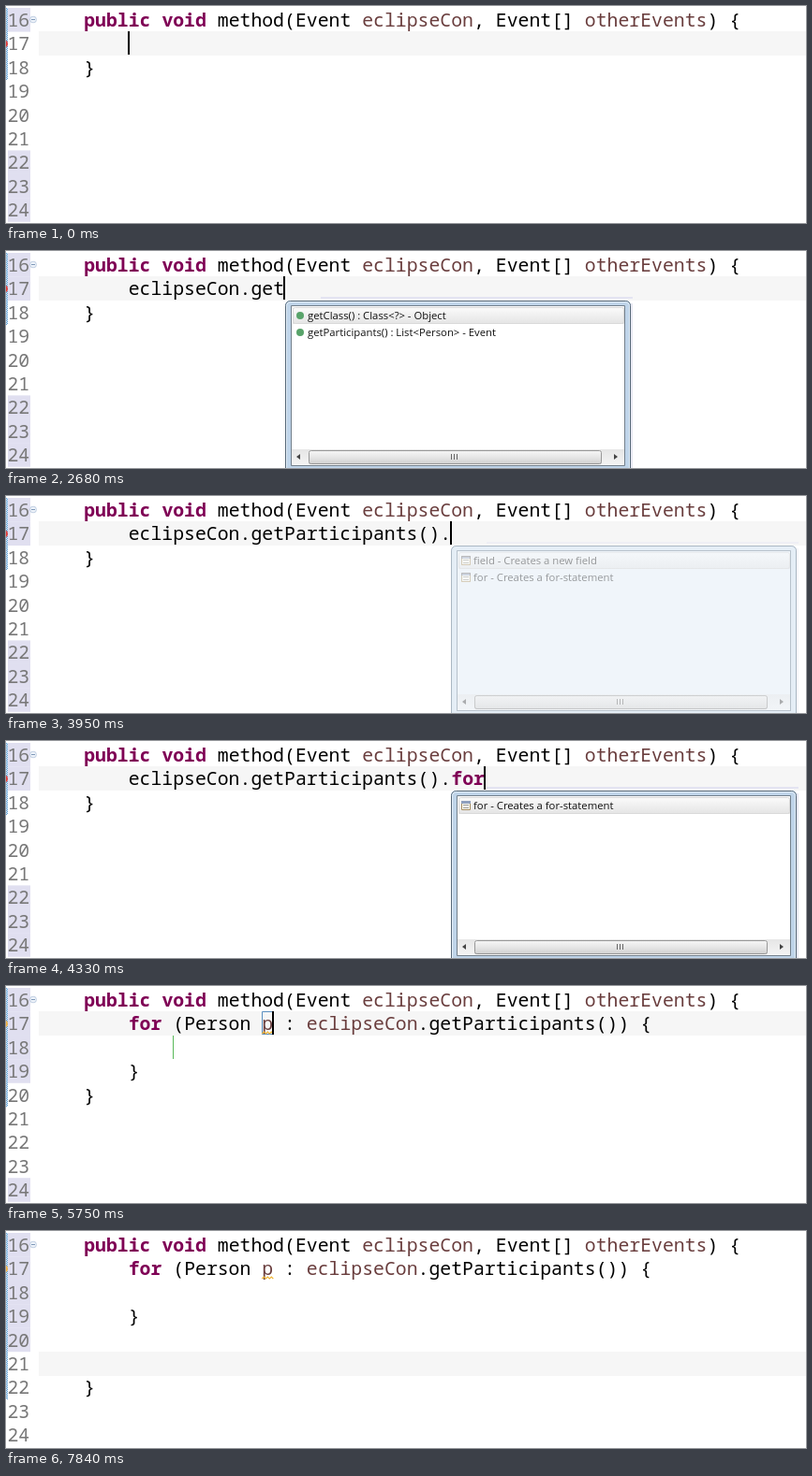
Animation of 854 by 232 pixels, one loop 8 s. Source, as an HTML page with a canvas:

```html
<!DOCTYPE html>
<html lang="en">
<head>
<meta charset="utf-8">
<title>Code completion</title>
<style>
  html, body { margin: 0; width: 100%; height: 100%; overflow: hidden; background: #fff; }
  canvas { display: block; }
</style>
</head>
<body>
<canvas id="stage" width="854" height="232"></canvas>
<script>
const ctx = document.getElementById('stage').getContext('2d');
const LOOP = 8000, COL = 11.88, ROW = 25.4, LEFT = 35.7, TOP = 2, FIRST = 16;
const CODE = '19.8px "Noto Sans Mono", monospace';
const UI = '11.3px "Open Sans", sans-serif';
const COLORS = { keyword: '#7f0055', param: '#6a3e3e', text: '#000', number: '#787878', changed: '#e0dff0' };
const KEYWORDS = new Set(['public', 'void', 'for']);
const PARAMS = new Set(['eclipseCon', 'otherEvents', 'p']);
const HEADER = 'public void method(Event eclipseCon, Event[] otherEvents) {';

const colX = col => LEFT + col * COL;
const rowY = line => TOP + (line - FIRST) * ROW;

// Typed text of line 17 and the time of each keystroke.
const TYPING = [
  [0, ''], [490, 'e'], [690, 'ecl'], [890, 'ecli'], [1090, 'eclipseCon'],
  [1720, 'eclipseCon.'], [2120, 'eclipseCon.g'], [2235, 'eclipseCon.ge'],
  [2350, 'eclipseCon.get'], [2810, 'eclipseCon.getP'], [3070, 'eclipseCon.getPa'],
  [3230, 'eclipseCon.getParticipants()'], [3560, 'eclipseCon.getParticipants().'],
  [4040, 'eclipseCon.getParticipants().f'], [4200, 'eclipseCon.getParticipants().fo'],
  [4330, 'eclipseCon.getParticipants().for']
];
// Caret moves after the template is inserted: time, line, column.
const MOVES = [[4590, 17, 26], [5520, 17, 21], [6050, 18, 12], [6810, 19, 9], [7110, 20, 8], [7310, 21, 8]];
const INSERTED = MOVES[0][0];

const latest = (list, t) => list.filter(item => item[0] <= t).pop();

function rect(x, y, w, h, color) {
  ctx.fillStyle = color;
  ctx.fillRect(x, y, w, h);
}

function frame(x, y, w, h, color, radius = 0) {
  ctx.strokeStyle = color;
  ctx.lineWidth = 1;
  ctx.beginPath();
  ctx.roundRect(x + .5, y + .5, w - 1, h - 1, radius);
  ctx.stroke();
}

function vertical(y, h, ...colors) {
  const gradient = ctx.createLinearGradient(0, y, 0, y + h);
  colors.forEach((c, i) => gradient.addColorStop(i / (colors.length - 1), c));
  return gradient;
}

function dot(x, y, r, color) {
  ctx.fillStyle = color;
  ctx.beginPath();
  ctx.arc(x, y, r, 0, 7);
  ctx.fill();
}

function codeLine(line, col, text, colored = true) {
  for (const [word] of text.matchAll(/\w+|\W+/g)) {
    const keyword = KEYWORDS.has(word);
    ctx.font = (keyword ? 'bold ' : '') + CODE;
    ctx.fillStyle = keyword ? COLORS.keyword
      : colored && PARAMS.has(word) ? COLORS.param : COLORS.text;
    ctx.fillText(word, colX(col), rowY(line) + 20);
    col += word.length;
  }
}

function gutter(t, lastLine) {
  const isChanged = n => {
    if (t < INSERTED) return n === 16 || n >= 22 || (n === 17 && t >= 430);
    if (t < 7110) return n <= 19 || n === 24;
    return n <= (t < 7310 ? 19 : 20);
  };
  ctx.font = CODE;
  for (let n = FIRST; n <= 24; n++) {
    if (isChanged(n)) rect(2, rowY(n), 24, ROW + .2, COLORS.changed);
    ctx.fillStyle = COLORS.number;
    ctx.fillText(n, 1.5, rowY(n) + 20);
  }
  // Checkered range marker along the method.
  const end = rowY(lastLine + 1);
  rect(0, TOP, 2, end - TOP, '#e4f0fa');
  for (let y = TOP; y < end; y++) rect(y % 2, y, 1, 1, '#5a9fd8');

  dot(29, 14.5, 3.8, '#c3d1e3');
  dot(29, 14.5, 2.8, '#eef3fa');
  rect(27, 14, 4, 1, '#7f98b8');

  const warning = t >= 5750;
  const markerLine = t >= INSERTED && !warning ? 19 : 17;
  dot(-2, rowY(markerLine) + 13, 4, warning ? '#f3b54a' : '#e5403c');
}

function arrow(x, y, dir) {
  ctx.fillStyle = '#444';
  ctx.beginPath();
  ctx.moveTo(x - dir * 2, y - 3);
  ctx.lineTo(x + dir * 2, y);
  ctx.lineTo(x - dir * 2, y + 3);
  ctx.fill();
}

function popup(x, items, alpha, isMethod) {
  ctx.save();
  ctx.globalAlpha = alpha;
  ctx.translate(x, 0);
  rect(38, 49, 333, 2, '#e4e4f2');
  rect(369, 56, 2, 176, '#e8e8f2');
  ctx.fillStyle = '#bfd4e9';
  ctx.beginPath();
  ctx.roundRect(0, 53, 369, 190, 5);
  ctx.fill();
  frame(0, 53, 369, 190, '#566878', 5);
  frame(1, 54, 367, 190, '#e3eef8', 4);
  frame(6, 58, 357, 172, '#73808c');
  rect(7, 59, 355, 170, '#fff');

  rect(8, 61, 354, 17, vertical(61, 17, '#fafafa', '#e4e4e4'));
  frame(8, 60, 354, 18, '#d9d9d9', 2);
  items.forEach((item, i) => {
    const y = 60 + i * 18;
    if (isMethod) dot(16, y + 9, 4, '#58a36a');
    else {
      rect(11, y + 4, 10, 10, '#fffdf0');
      frame(11, y + 4, 10, 10, '#a58d63');
      rect(11, y + 4, 10, 3, '#8e9fbe');
      for (let k = 0; k < 2; k++) rect(13, y + 8 + k * 3, 6, 1, '#9a9a9a');
    }
    ctx.font = UI;
    ctx.fillStyle = '#111';
    ctx.fillText(item, 24, y + 13);
  });

  rect(7, 212, 355, 17, vertical(212, 17, '#e6e6e6', '#f4f4f4'));
  ctx.fillStyle = vertical(213, 15, '#f7f7f7', '#e6e6e6', '#cfcfcf');
  ctx.beginPath();
  ctx.roundRect(25, 213, 313, 15, 2);
  ctx.fill();
  frame(25, 213, 313, 15, '#989898', 2);
  for (let k = 0; k < 3; k++) rect(177 + k * 3, 217, 1, 6, '#666');
  arrow(14, 220, -1);
  arrow(353, 220, 1);
  ctx.restore();
}

function popups(t) {
  if (t >= 2680 && t < 3260) {
    const items = ['getParticipants() : List<Person> - Event'];
    if (t < 2810) items.unshift('getClass() : Class<?> - Object');
    popup(298, items, t < 3230 ? 1 : .4, true);
  }
  if (t >= 3920 && t < 4620) {
    const items = ['for - Creates a for-statement'];
    if (t < 4200) items.unshift('field - Creates a new field');
    const fade = t < 4040 ? (Math.floor((t - 3920) / 30) + 1) / 5
      : t < 4560 ? 1 : t < 4590 ? .65 : .3;
    popup(475, items, fade, false);
  }
}

function squiggle(x, y, width) {
  ctx.strokeStyle = '#f0b432';
  ctx.lineWidth = 1.2;
  ctx.beginPath();
  for (let i = 0; i <= width; i += 2) ctx.lineTo(x + i, y + (i % 4 ? -1 : 1));
  ctx.stroke();
}

function loopCode(t) {
  const name = t < 5520 ? 'person' : 'p';
  codeLine(17, 8, `for (Person ${name} : eclipseCon.getParticipants()) {`, t >= 5750);
  codeLine(19, 8, '}');
  if (t < 6050) {
    const x = Math.round(colX(20)), y = 28, w = Math.round(name.length * COL);
    if (name === 'person') {
      rect(x, y - 1, w, 25, '#3399ff');
      ctx.font = CODE;
      ctx.fillStyle = '#fff';
      ctx.fillText(name, colX(20), rowY(17) + 20);
    }
    frame(x, y - 1, w, 25, '#5b8fc0');
    rect(178, 53, 1, 25, '#58b858');
  }
  if (t >= 5750) squiggle(colX(20), 50, 12);
}

function draw(t) {
  const inserted = t >= INSERTED;
  const [typedAt, typed] = latest(TYPING, t);
  const [movedAt, line, col] = inserted ? latest(MOVES, t) : [typedAt, 17, 8 + typed.length];
  const lastLine = !inserted ? 18 : t < 7110 ? 20 : t < 7310 ? 21 : 22;

  rect(0, 0, 854, 232, '#fff');
  rect(35, Math.round(rowY(line)), 819, 26, '#f6f6f6');
  gutter(t, lastLine);
  codeLine(16, 4, HEADER);
  if (inserted) loopCode(t);
  else codeLine(17, 8, typed, false);
  codeLine(lastLine, 4, '}');

  if ((t - movedAt) % 1060 < 530) {
    rect(Math.round(colX(col)) - 1, Math.round(rowY(line)), 2, 25, '#000');
  }
  popups(t);
}

function tick(now) {
  draw(now % LOOP);
  requestAnimationFrame(tick);
}
requestAnimationFrame(tick);
</script>
</body>
</html>
```
